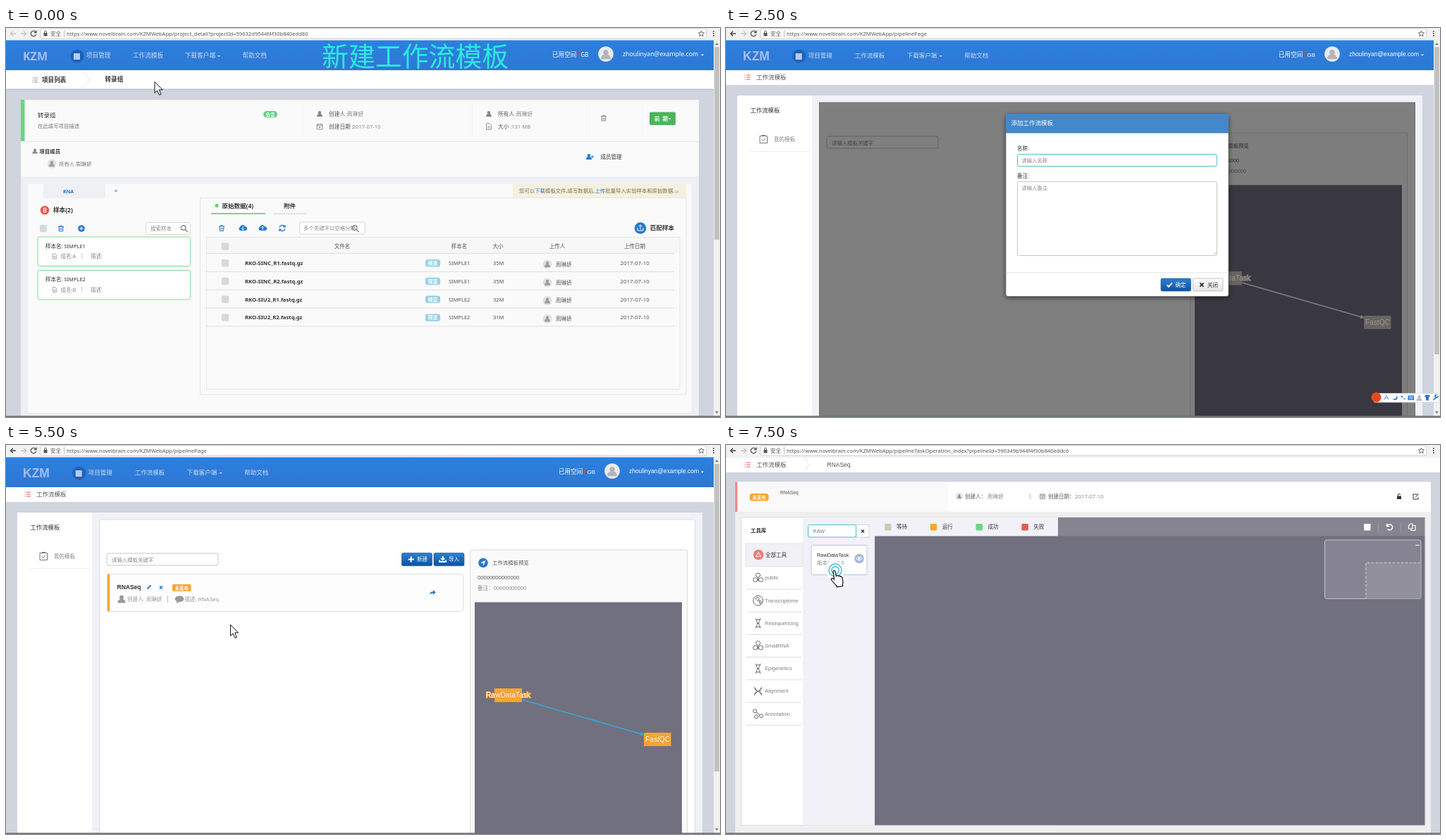
Animation of 1013 by 553 pixels, one loop 8 s. Source, as an HTML page:

```html
<!DOCTYPE html>
<html lang="zh-CN">
<head>
<meta charset="utf-8">
<title>新建工作流模板</title>
<style>
html, body { margin: 0; width: 100%; height: 100%; overflow: hidden; background: #d0d4df }
svg { display: block; width: 100%; height: 100% }
svg, .web { font-family: "Noto Sans", "Noto Sans CJK SC", "Noto Sans CJK JP", sans-serif }
.arial { font-family: "Liberation Sans", "Noto Sans CJK SC", "Noto Sans CJK JP", sans-serif }
/* y of a text is the middle of its line */
text { transform: translateY(2.8px); white-space: pre }
.b { font-weight: 700 }
.s { font-weight: 500 }
.m { text-anchor: middle }
.halo { paint-order: stroke; stroke-width: 2px }
.ln { fill: none; stroke: currentColor }
/* --s: first half second shown; dN: number of half seconds */
.on { animation: 8s step-end infinite; animation-delay: calc((var(--s) - 16) * 500ms) }
.d1 { animation-name: d1 } .d2 { animation-name: d2 } .d3 { animation-name: d3 }
.d4 { animation-name: d4 } .d6 { animation-name: d6 } .d11 { animation-name: d11 }
@keyframes d1 { 0% { opacity: 1 } 6.25%, 100% { opacity: 0 } }
@keyframes d2 { 0% { opacity: 1 } 12.5%, 100% { opacity: 0 } }
@keyframes d3 { 0% { opacity: 1 } 18.75%, 100% { opacity: 0 } }
@keyframes d4 { 0% { opacity: 1 } 25%, 100% { opacity: 0 } }
@keyframes d6 { 0% { opacity: 1 } 37.5%, 100% { opacity: 0 } }
@keyframes d11 { 0% { opacity: 1 } 68.75%, 100% { opacity: 0 } }
</style>
</head>
<body>
<svg viewBox="0 0 1013 553" preserveAspectRatio="none">
<defs>
  <linearGradient id="sky" x2="0" y2="1"><stop stop-color="#2b80de"/><stop offset="1" stop-color="#2f77d5"/></linearGradient>
  <linearGradient id="btn" x2="0" y2="1"><stop stop-color="#2f80d0"/><stop offset="1" stop-color="#0d52a2"/></linearGradient>
  <linearGradient id="pale" x2="0" y2="1"><stop stop-color="#fff"/><stop offset="1" stop-color="#e2e2e2"/></linearGradient>
  <filter id="shade" x="-10%" y="-10%" width="120%" height="120%"><feDropShadow dx="0" dy="2" stdDeviation="3" flood-opacity=".55"/></filter>
  <path id="trash" class="ln" d="M-4-2.5h8M-1.3-2.5v-1.4h2.6v1.4M-3-2.5l.3 6.4h5.4l.3-6.4M-1-.6v3M1-.6v3"/>
  <path id="man" fill="currentColor" d="M0-4a2.2 2.2 0 0 1 1.3 4C3 .5 4 1.6 4 4h-8C-4 1.6-3 .5-1.3 0A2.2 2.2 0 0 1 0-4z"/>
  <path id="list" class="ln" d="M-4-3h1.2m1.3 0H4M-4 0h1.2m1.3 0H4M-4 3h1.2m1.3 0H4"/>
  <path id="find" class="ln" stroke-width="1.4" d="M2-1a3.3 3.3 0 1 1-6.6 0A3.3 3.3 0 0 1 2-1M1.2 1.4L4.800 5"/>
  <path id="doc" class="ln" stroke-width=".9" d="M-3.5-4.3h4.6L3.5-2v6.300h-7zM-1.8 0h3.6M-1.8 2h3.6"/>
  <path id="cal" class="ln" stroke-width=".9" d="M-4-3h8v7h-8zM-4-1h8M-2-4.4v2M2-4.4v2M0 .3v2.4M-1.2 1.5h2.4"/>
  <path id="cloud" fill="currentColor" d="M-3.3 4a2.7 2.7 0 0 1-.5-5.2A3.6 3.6 0 0 1 3-1.8 2.9 2.9 0 0 1 3.5 4z"/>
  <path id="turn" class="ln" stroke-width="1.4" d="M-4-.8a4 4 0 0 1 7-1.8M4 .8a4 4 0 0 1-7 1.8M4-4.4v2.6H1.4M-4 4.4V1.800h2.6"/>
  <path id="tick" class="ln" stroke-width="2" d="M-3.6.2l2.4 2.5L3.700-2.6"/>
  <path id="cross" class="ln" stroke-width="1.9" d="M-2.6-2.6l5.2 5.2m0-5.2l-5.2 5.2"/>
  <path id="plus" class="ln" stroke-width="2" d="M-4 0h8M0-4v8"/>
  <path id="pen" class="ln" stroke-width="2" d="M-2.5 2.5l5-5"/>
  <path id="save" class="ln" stroke-width="1.8" d="M0-4.5V1M-2.5-1.5L0 1l2.5-2.5M-4.5 1v2.5h9V1"/>
  <path id="wrench" class="ln" stroke-width="1.8" d="M-3 3.500L1-1M3.500-2.500a2 2 0 1 1-2-1.500"/>
  <path id="caret" fill="currentColor" d="M-2-1h4L0 1.2z"/>
  <path id="back" class="ln" stroke-width="1.3" d="M4 0h-7.500M0-3.500L-3.500 0 0 3.500"/>
  <rect id="box" x="-5.200" y="-5.200" width="10.400" height="10.400" rx="2" fill="#d5dada"/>
  <g id="face"><circle r="6.5" fill="#e0e1e4"/><use href="#man" color="#9a9da2"/></g>
  <path id="clover" class="ln" d="M3-4a3 3 0 1 1-6 0a3 3 0 0 1 6 0M-1 2.5a3 3 0 1 1-6 0a3 3 0 0 1 6 0M7 2.5a3 3 0 1 1-6 0a3 3 0 0 1 6 0M0-1v6"/>
  <path id="globe" class="ln" d="M7 0A7 7 0 1 1-7 0A7 7 0 0 1 7 0M-4-3l4-2 2 3-3 2zM1 0l4 1-2 4z"/>
  <path id="helix" class="ln" d="M-3-7c0 6 6 8 6 14M3-7c0 6-6 8-6 14M-3-5h6M-2 0h4M-3 5h6"/>
  <path id="strands" class="ln" d="M-5.500-6q6 6 0 12M5.500-6q-6 6 0 12M-5.500-4l11 8M5.500-4l-11 8"/>
  <path id="nodes" class="ln" d="M-2-4a2.500 2.500 0 1 1-5 0a2.500 2.500 0 0 1 5 0M0 4a2.500 2.500 0 1 1-5 0a2.500 2.500 0 0 1 5 0M7 3a2.500 2.500 0 1 1-5 0a2.500 2.500 0 0 1 5 0M-2.500-2.500L2.500 1.500"/>
  <path id="arrow" fill="#fff" stroke="#111" d="M.5.5v15.8l3.6-3.4 2.8 6.3 2.6-1.1-2.8-6.2h5z"/>
  <path id="hand" fill="#fff" stroke="#111" stroke-width="1.2" d="M1 2.2C.8.3 3.6 0 4 2l1.2 6.2c.6-1.4 2.6-1.2 3 .2.8-1 2.4-.8 2.8.6.9-.6 2.4-.2 2.7 1.2l1.2 5.6c.2 1.6-.2 3-.6 4.6l.2 2.4-8.4 1-.6-2.2C3.5 20 1 17-1.4 14c-1.2-1.6.6-3.2 2.2-2.2L2.6 13z"/>
  <g id="ring"><circle r="13" fill="#fff" opacity=".88"/><g fill="none" stroke="#45b6dd" stroke-width="1.4"><circle r="9"/><circle r="5.2"/></g></g>
  <g id="pulse"><circle r="11.5" fill="#d9eff8" opacity=".8"/><circle r="9" fill="#fff" stroke="#35aedb" stroke-width="1.4"/><circle r="6.8" fill="#25a4d4"/></g>
</defs>
<g id="stage"></g>
</svg>
<script>
const W = '#fff', INK = '#333', TXT = '#555', GREY = '#888', BLUE = '#2878cc', ORANGE = '#f8a630',
  LINE = '#e4e6e8', BG = '#d0d4df', LOGO = '#a9bdf0', RED = '#e0584e', NAME = '周琳妍', DATE = '2017-07-10';

const t = (x, y, s, size = 7.5, fill = TXT, cls = '', more = '') =>
  `<text x="${x}" y="${y}" font-size="${size}" fill="${fill}" class="${cls}" ${more}>${s}</text>`;
const r = (x, y, w, h, fill = 'none', stroke = 'none', rx = 0, more = '') =>
  `<rect x="${x}" y="${y}" width="${w}" height="${h}" fill="${fill}" stroke="${stroke}" rx="${rx}" ${more}/>`;
const p = (d, fill = 'none', stroke = 'none', width = 1) =>
  `<path d="${d}" fill="${fill}" stroke="${stroke}" stroke-width="${width}"/>`;
const l = (d, stroke = LINE, width = 1) => p(d, 'none', stroke, width);
const c = (x, y, rad, fill) => `<circle cx="${x}" cy="${y}" r="${rad}" fill="${fill}"/>`;
const u = (id, x, y, color = GREY, k = 1) =>
  `<use href="#${id}" transform="translate(${x} ${y}) scale(${k})" color="${color}"/>`;
const on = (start, n, ...kids) => `<g class="on d${n}" style="--s:${start}">${kids.join('')}</g>`;
const each = (list, f) => list.map(f).join('');

const chrome = (path, back) => '<g class="web">' + r(0, 0, 1013, 17.5, '#f2f2f2') + r(49, 1, 945, 14, W, '#cfcfcf', 2) +
  u('back', 10, 8, back) + u('back', 25, 8, '#c4c4c4', -1) +
  l('M42.2 5.8a3.8 3.8 0 1 0 .6 3M43 3.500v3h-3', TXT, 1.3) + r(53.5, 7, 5, 4.5, TXT) +
  l('M54.500 7V5.500a1.500 1.500 0 0 1 3 0V7', TXT) + t(63, 8, '安全') + l('M82.500 3v10', '#bbb') +
  t(86, 7.8, 'https://www.novelbrain.com/KZMWebApp/' + path, 7.6) +
  l('M986.5 4l1.200 2.700 2.800.2-2.100 1.900.7 2.800-2.600-1.500-2.600 1.500.7-2.800-2.100-1.900 2.800-.2z', TXT, .9) +
  each([4, 7, 10], y => r(1003, y, 1.8, 1.8, TXT)) + '</g>';

const header = (dx, ux, size, mail, logo) => r(0, 17.5, 1004, 42.5, 'url(#sky)') + t(24, 43, 'KZM', logo, LOGO, 'b') +
  c(101 + dx, 40, 9.5, '#1d62b8') + r(96 + dx, 36, 9, 9, '#b9c9f0') +
  each([[114, '项目管理'], [180, '工作流模板'], [254, '下载客户端'], [335.5, '帮助文档']],
    ([x, s]) => t(x + dx, 39, s, size, '#ccdcf5')) + u('caret', 302 + dx, 40, '#ccdcf5') +
  t(775 + ux, 38, '已用空间', 8.6, W, 's') + t(815.5 + ux, 38, 'GB', 8, W, 's') + t(810 + ux, 37.5, 0, 8.5, '#f0382c', 'b') +
  c(851 + ux, 37, 10.8, '#e9ebee') + u('man', 851 + ux, 37.5, '#b3b5ba', 1.7) +
  t(875 + ux, 37, 'zhoulinyan@example.com', mail, W) + u('caret', 988, 38.5, W);

const floor = r(0, 551.3, 1013, 1.7, '#6d737b');
const scroll = h => r(1004, 17.5, 9, 536, '#f1f1f1') + p('M1006 24h5l-2.500-3zM1006 545h5l-2.500 3z', '#777') +
  r(1005, 27, 7, h, '#c1c1c1') + floor;
const button = (x, y, w, h, icon, s, tx) => r(x, y, w, h, 'url(#btn)', '#0f4f98', 2, 'stroke-width=".6"') +
  u(icon, tx - 8.300, y + 9, W) + t(tx, y + 9, s, 7.5, W);
const badge = (x, y, w, h, s, fill, rx, size = 6.5) => r(x, y, w, h, fill, 'none', rx) +
  t(x + w / 2, y + h / 2, s, size, W, 'm b');
const nodes = (line, fill, ink, rim) => l('M732 362l170 49', line, 1.4) + p('M906 412l-6.500 1.300 1.500-5.200z', line) +
  r(693, 346, 39, 19.5, fill) + r(905, 409, 38.5, 19, fill) +
  t(681, 356.7, 'RawDataTask', 10.2, ink, 'halo', `stroke="${rim}"`) +
  t(907, 419.3, 'FastQC', 10.2, ink, 'halo', `stroke="${rim}"`);
const click = (start, x, y, under = '') =>
  on(start, 2, on(start + 1, 1, under, u('ring', x, y)), u('hand', x - 4, y));

const sample = (y, n, group) => r(45, y, 216.5, 41.5, W, '#85d99a', 2.5) + t(56, y + 13, '样本名: SIMPLE' + n, 7.5, INK, 's') +
  u('doc', 69, y + 27.5, GREY, .8) + t(77.5, y + 27.5, '组名:' + group, 7.5, GREY) +
  l(`M107.5 ${y + 23}v8`, '#ccc') + t(120, y + 27.5, '描述:', 7.5, GREY);

const fileRow = ([name, n, size], i) => {
  const y = 334.2 + i * 25.8;
  return l(`M284 ${y + 12.300}h664`, '#dcdfe1') + u('box', 311, y) + t(339, y, `RKO-${name}.fastq.gz`, 7.7, INK, 'b') +
    badge(595, y - 5.2, 21, 10.5, '预览', '#99d2e5', 3, 7) + t(628, y, 'SIMPLE' + n) + t(691, y, size) +
    u('face', 768, y + 1.8) + t(780, y + 1.8, NAME) + t(871.5, y, DATE, 7.9);
};

const project = [
  r(0, 17, 1013, 536, BG),
  chrome('project_detail?projectId=59632d9544f4f30b840edd80', '#c4c4c4'), header(0, 0, 8.6, 8.7, 16),
  t(448, 51, '新建工作流模板', 37.9, '#2ce9e0'),
  r(0, 86, 1004, 2, '#bcc0ca'), r(0, 60, 1004, 26.5, W), l('M107 60l12.500 13.500L107 86.500'), u('list', 41, 74),
  t(51, 74, '项目列表', 8.6, INK, 'b'), t(140.5, 73.5, '转录组', 8.6, INK, 'b'),
  r(21, 102, 962, 451, '#eeeff2'), r(21, 102, 962, 109, '#fafafa'), r(21, 102, 5.5, 59, '#6fd383'), l('M27 161.500h956'),
  l('M421.500 108v46M661.500 108v46M823.500 108v46M903.500 108v46', '#f1f1f1'),
  t(45, 124, '转录组', 8.5, INK, 's'), t(45, 139.5, '在此填写项目描述', 7.4, '#777'),
  badge(365, 118, 20, 9.5, '负责', '#68cf80', 4.7),
  u('man', 445, 122), u('cal', 445, 140), u('man', 685, 122), u('doc', 685, 140), u('trash', 848, 128),
  each([[458, 122.5, '创建人 :', 484, NAME], [458, 140, '创建日期 :', 491.5, DATE],
    [698, 122.5, '所有人 :', 724, NAME], [698, 140, '大小 :', 717, '131 MB']],
    ([x, y, key, vx, val]) => t(x, y, key, 7.7) + t(vx, y, val, 7.7, GREY)),
  r(913, 119.5, 37, 18.5, '#4db45c', 'none', 2), t(920, 129, '前  期', 7.5, W, 'b'), u('caret', 941.5, 129, W),
  u('man', 41, 175, GREY, .9), t(47.5, 175.5, '项目成员', 7.4, INK, 'b'),
  u('face', 65, 193), t(75, 193, '所有人 ' + NAME, 7.4, '#777'),
  u('man', 827, 183, BLUE), u('plus', 832, 183, BLUE, .5), t(843.5, 183, '成员管理', 7.5, INK),

  r(31, 222, 941.5, 325, '#fafafa'), l('M31 547.500h942'), r(53, 222, 88, 19.5, '#eef0f3'),
  t(88.5, 232, 'RNA', 7, BLUE, 'b m'), t(156, 231.5, '+', 7.5, BLUE, 'b m'), r(719, 222, 246, 19, '#f6f1df'),
  t(728, 231.5, `您可以<tspan fill="${BLUE}">下载</tspan>模板文件,填写数据后,<tspan fill="${BLUE}">上传</tspan>批量导入实验样本和原始数据.`, 7.4, '#7a6f58'),
  u('cross', 952, 233, '#ccc7b8', .8),
  c(55, 259, 6.3, '#e4604d'), l('M53.500 256h3v6h-3zM53.500 259h3', W), t(67, 259.5, '样本(2)', 8.6, INK, 'b'),
  u('box', 53, 285), u('trash', 78, 285, BLUE), c(107, 285, 4.8, BLUE), u('plus', 107, 285, W, .6),
  r(198.5, 276.5, 63, 17, W, '#d3d6d9', 2), t(205, 285, '搜索样本', 7.5, GREY), u('find', 253, 285),
  sample(297, 1, 'A'), sample(344.5, 2, 'B'),

  r(275.5, 241.5, 689.5, 279.5, 'none', LINE), r(284.5, 297.5, 671.5, 216, 'none', LINE),
  c(299, 252.5, 2.5, '#5fcf7a'), r(291, 263, 77, 1.6, '#5fc98a'), r(379, 263.5, 48, 1.2, '#d5d8da'),
  each([[306.5, 253.5, '原始数据(4)'], [394, 253.5, '附件'], [914, 284.5, '匹配样本']], ([x, y, s]) => t(x, y, s, 8.5, INK, 'b')),
  u('trash', 306, 284.5, BLUE), u('cloud', 336, 284, BLUE), u('cloud', 364, 284, BLUE), u('turn', 392, 284.5, BLUE),
  c(900, 284.5, 8.3, BLUE),
  l('M336 282v5M334.300 285.300l1.700 1.700 1.700-1.700M364 287v-5M362.300 283.700l1.700-1.700 1.700 1.700M900 286.500v-6.500M897.800 282l2.200-2.200 2.200 2.200M896 284v4h8v-4', W),
  r(416.5, 276, 93, 17, W, '#d3d6d9', 2), t(422, 284.5, '多个关键字以空格分隔', 7.4, GREY), u('find', 496, 285),
  r(285, 298, 670, 22, '#f7f7f7'), l('M284 320.500h664', '#dcdfe1'), u('box', 311, 310.5),
  each([[477, '文件名'], [643, '样本名'], [698, '大小'], [782, '上传人'], [892, '上传日期']], ([x, s]) => t(x, 310, s, 7.5, TXT, 'm')),
  each([['SINC_R1', 1, '35M'], ['SINC_R2', 1, '35M'], ['SIU2_R1', 2, '32M'], ['SIU2_R2', 2, '31M']], fileRow),
  scroll(274),
  on(0, 1, u('arrow', 210.5, 76)),
  on(1, 2, r(-1, 540.5, 337.5, 11.5, '#f0f0f0', '#c8c8c8'), t(1, 545.8, 'https://www.novelbrain.com/KZMWebApp/pipelinePage', 6.5)),
  click(1, 201.5, 42.5, t(180, 39, '工作流模板', 8.6, W, 'b')),
];

const card = [
  r(143.5, 183.5, 505, 53, '#fdfdfd', '#dedede', 2), r(144, 183.5, 3.2, 53, ORANGE),
  t(157.5, 202, 'RNASeq', 8.5, INK, 'b'), u('pen', 203, 202, BLUE), u('cross', 220, 202.5, BLUE, .75),
  p('M601.500 213c0-3.500 1.500-4.500 4.500-4.500V206l3.700 3.500-3.700 3.500v-2.300c-2.200 0-3.400.5-4.500 2.300z', BLUE),
  badge(236, 198, 26.5, 10, '未发布', ORANGE, 1.5),
  u('man', 164, 219, '#999', 1.35), t(172, 219, '创建人: ' + NAME, 7.5, '#999'), l('M229.500 214v10', '#bbb'),
  p('M246 214.500c8.500 0 8.500 8.500 0 8.500l-4.500 2 .8-2.800c-5-3-2-7.700 3.700-7.700z', '#999'), t(253.5, 219, '描述: RNASeq', 7.5, '#999'),
  on(11, 1, u('arrow', 318, 255)), on(13, 1, u('pulse', 319, 213)), on(12, 2, u('arrow', 318, 211)),
];

const fields = (first, second) => r(413.5, 179.5, 283, 17, 'none', first, 2) + r(413.5, 218.5, 283, 105, 'none', second, 2);
const inputBar = [
  r(920, 519.5, 92, 12.5, W, '#d8dde2'), c(922.5, 525, 7, '#e8481f'), t(937, 525.7, 'A', 9.5, BLUE, 'm'),
  p('M951 521.500c1.500 4-1.500 7-5.500 5.500 3 4 8.500 1 7-3z', BLUE), c(959, 524, 1.2, BLUE), c(962.5, 527, 1, BLUE),
  r(967.5, 522.5, 8.5, 6.5, BLUE), l('M969 524.500h5.500M969 527h5.500', W), u('man', 983.5, 526, '#b8bcc2'),
  p('M991 523l2.500-1.500h3l2.500 1.500-1 2-1-.5v5h-4v-5l-1 .5z', BLUE), u('wrench', 1006.5, 525.5, BLUE),
];

const dialog = [
  r(132, 105.5, 846, 448, '#000', 'none', 0, 'opacity=".5"'), r(665, 223.5, 294, 330, '#393841'),
  nodes('#817f89', '#69645f', '#99979a', '#69645f'),
  r(397, 122, 316, 259.5, W, TXT, 3, 'stroke-width=".6" filter="url(#shade)"'), p('M397 149.500V125q0-3 3-3h310q3 0 3 3v24.500z', '#4388cb'),
  t(404.5, 135.5, '添加工作流模板', 8.5, W), t(413, 171, '名称:', 7.5, INK, 's'), t(413, 210, '备注:', 7.5, INK, 's'),
  l('M397 347.500h316'), l('M692 322l4-4M694.500 322l1.500-1.500', '#999', .7),
  button(617, 356, 42.5, 18, 'tick', '确定', 637.5),
  r(662.5, 356, 42.5, 18, 'url(#pale)', '#c4c4c4', 2), u('cross', 675, 365, INK), t(683, 365, '关闭', 7.5, INK),
  on(5, 2, fields('#4cc0cf', '#c9c9b9'), t(419.5, 188, '请输入名称', 7.3, GREY), t(419.5, 227, '请输入备注', 7.3, GREY)),
  on(7, 4, fields('#444', '#444'), each([188, 227], y => t(420, y, 'RNASeq', 7.3) + u('tick', 688, y, INK)),
    l('M420 231.300h28.500', '#e8584c', .9),
    click(9, 640, 368, r(617, 356, 42.5, 18, '#0f58ac', 'none', 2))),
];

const templates = [
  r(0, 17, 1013, 536, BG), chrome('pipelinePage', '#444'), header(2.7, 9, 8.5, 8.43, 17.5),
  r(0, 60, 1004, 21, W), u('list', 30.5, 70, RED), t(43, 70.5, '工作流模板', 8.5),
  r(16, 96, 972, 457, '#f1f2f7'), r(16, 96, 106, 457, W), t(34.5, 117, '工作流模板', 8.4, INK),
  l('M48 153.500h10.500v10H48zM51 152.500h4.500M50.500 158.500l2 2 3.500-4', '#777'), t(68, 158, '我的模板', 7.5, GREY), l('M34 175.500h86', '#f0f0f0'),
  r(132.5, 106, 845, 460, W, '#dadce0', 2), r(143, 154, 158, 17, W, '#c6c6c6', 2), t(150, 162.8, '请输入模板关键字', 7.4, GREY),
  button(561.5, 153.5, 43, 18.3, 'plus', '新建', 583), button(607, 153.5, 43, 18.3, 'save', '导入', 628),
  r(658.5, 149, 308, 420, '#fafafa', '#d9d9d9', 2), c(677, 167.5, 6.8, BLUE), p('M680.500 164l-7.200 3.300 3.300.8.800 3.300z', W),
  t(690, 167.5, '工作流模板预览', 7.4), t(669, 188.5, '00000000000000', 7.6), t(669, 203, '备注：00000000000', 7.6, GREY),
  r(665, 223.5, 294, 330, '#71707f'), nodes('#36a9de', ORANGE, W, '#f09a28'),
  click(3, 585, 167.5, r(561.5, 153.5, 43, 18.3, '#0f58ac', 'none', 2)),
  on(11, 3, ...card), on(5, 6, ...dialog), scroll(437), on(5, 2, ...inputBar),
];

const tools = [['clover', 'public'], ['globe', 'Transcriptome'], ['helix', 'Resequencing'], ['clover', 'SmallRNA'],
  ['helix', 'Epigenetics'], ['strands', 'Alignment'], ['nodes', 'Annotation']];
const states = [['#cbcbbb', '等待'], [ORANGE, '运行'], ['#6cd782', '成功'], ['#e25b50', '失败']];

const editor = [
  r(0, 17, 1013, 536, BG), chrome('pipelineTaskOperation_index?pipelineId=596349b944f4f30b840eddc6', '#444'),
  r(0, 17.5, 1013, 21.5, W), l('M111 17.500l7 10.500-7 10.500'), u('list', 30.5, 28, RED),
  t(43, 28, '工作流模板', 8.5), t(143.5, 28, 'RNASeq', 8.5),
  r(13, 52.5, 987, 501, '#efeff0'), r(13, 52.5, 987, 42.5, W), r(16, 52.5, 299, 42.5, '#f9f9f9'), r(13, 52.5, 3.3, 42.5, '#f28a86'),
  badge(33.5, 69, 27, 10.5, '未发布', ORANGE, 4), t(77, 67, 'RNASeq', 6.6),
  c(331, 73, 5.5, '#e8e8ec'), u('man', 331, 73, GREY, .7), t(339, 73, '创建人：'), t(371, 73, NAME, 7.5, GREY), l('M431.500 69v8', '#bbb'),
  c(449, 73, 5.5, '#e8e8ec'), u('cal', 449, 73, GREY, .8), t(457, 73, '创建日期：'), t(495, 73, DATE, 7.8, GREY, 'web'),
  r(952, 72.5, 6, 4.5, INK), l('M953.500 72.500v-1.500a1.600 1.600 0 0 1 3.200 0M981 70h-6v7h7v-3M978 74.500l4.500-5', INK),
  r(21.5, 103, 970.5, 437.5, W, '#dcdce2'), r(109, 103, 362, 437.5, '#f1f1f7'),
  r(471, 103, 520.5, 27, '#868490'), r(211, 129.5, 780.5, 411, '#71707f'),
  t(35, 121.5, '工具库', 7.4, INK, 'b'), r(28, 140, 81, 32.5, '#f1f1f6', '#e3e3e8'),
  c(46, 156, 7.3, '#f07b78'), l('M46 152.500l-3.500 6h7z', W), t(56, 156, '全部工具', 7.5, INK),
  each(tools, ([icon, s], i) => u(icon, 45.5, 189 + i * 32.2, '#666') + t(55, 188.7 + i * 32.2, s, 7.5, '#808080') +
    l(`M29 ${205 + i * 32.2}h78`, '#dedee0')),
  r(184.5, 113.5, 18.5, 17.5, W, '#d5d5da'), u('cross', 194, 122.5, INK, .75),
  r(116.5, 113.5, 68, 17.5, W, '#4cb9d8', 2), t(123.5, 122.5, 'RAW', 7.3, '#777'),
  r(121, 142.5, 79, 42, W, '#bcc3de', 2), t(129, 156, 'RawDataTask', 7.35, INK), t(129, 167, '版本：1.0.0', 7.4, GREY),
  c(189, 161.5, 6.8, '#a9b6de'), l('M184.500 161.500q4.500-5 9 0q-4.500 5-9 0z', W), c(189, 161.5, 1.5, W),
  each(states, ([color, s], i) => r(225 + i * 64.8, 112, 9.5, 9.5, color, 'none', 1.5) + t(242 + i * 64.8, 116.5, s, 7.5, INK)),
  l('M925.500 110v14M957.500 110v14', '#9a98a4'), r(905, 112, 9.5, 9.5, W),
  l('M938 115a4 4 0 1 1 .5 4.500M937.500 112v3.500h3.500', W, 1.5), l('M968.500 114.500l2.500-2.500h3v7h-5.500zM974 114.500h4v7h-6v-2.500', W, 1.2),
  r(849.5, 135, 136.5, 83.5, '#868492', '#c4c3cb', 3), l('M978 142.500h6', W),
  r(908, 167.5, 77.5, 51, '#918f9b'), `<path d="M985.5 167.5H908v51" fill="none" stroke="#b9b8c0" stroke-width="1.5" stroke-dasharray="4 2"/>`,
  floor, click(14, 155, 178),
];

document.getElementById('stage').innerHTML = on(0, 3, ...project) +
  '<g class="arial">' + on(3, 11, ...templates) + on(14, 2, ...editor) + '</g>';
</script>
</body>
</html>
```
